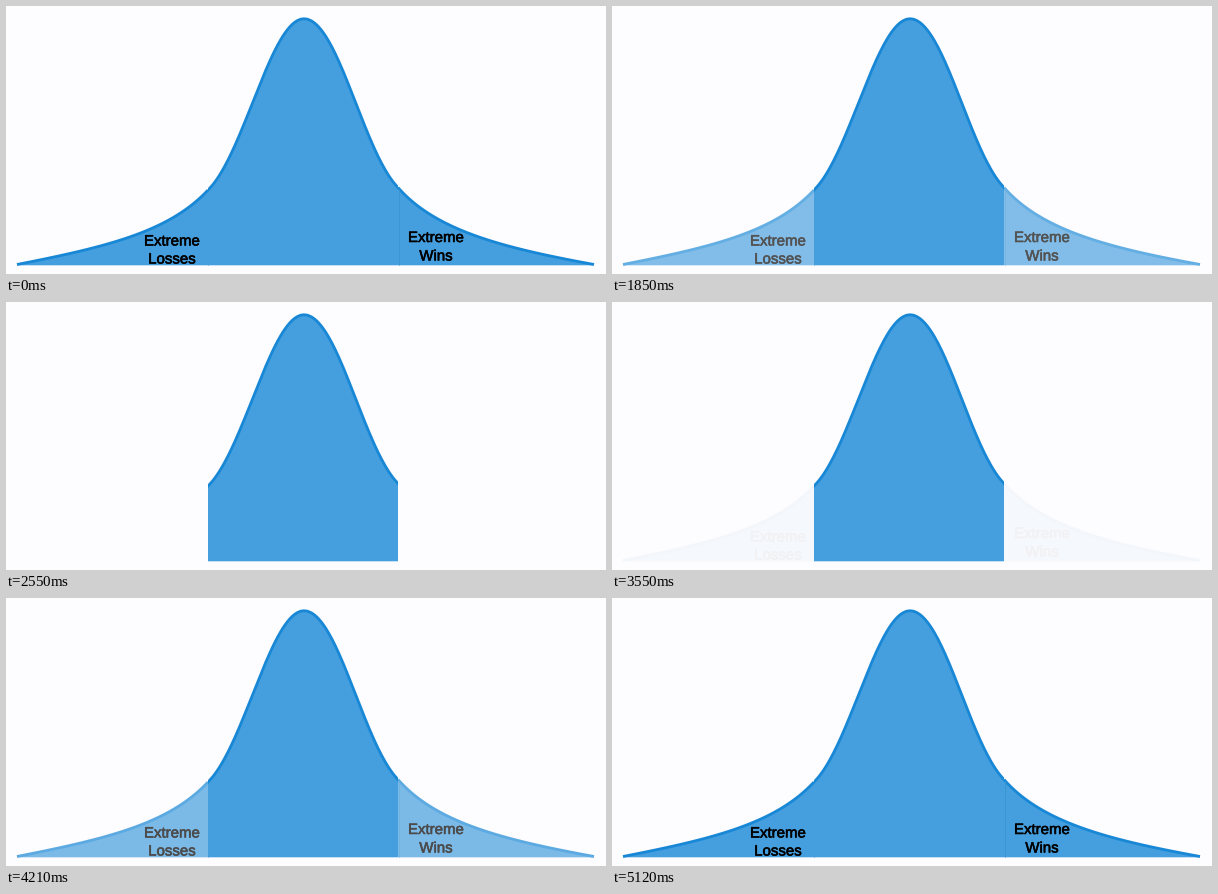
Write a matplotlib script that moves like this. It is 600x268 px and loops after 6 s.

```python
import numpy as np
import matplotlib.pyplot as plt
from matplotlib.animation import FuncAnimation
from matplotlib.patches import Polygon, Rectangle
from matplotlib.patheffects import withStroke

W, H, DPI = 600, 268, 100
PX = 72 / DPI
STEP, LOOP = 30, 6000
BG, FILL, EDGE, SEAM = "#fdfcfe", "#459fde", "#1888d6", "#3b95d3"
LEFT, RIGHT, BASE = 202, 392, 259.3

fig = plt.figure(figsize=(W / DPI, H / DPI), dpi=DPI, facecolor=BG)
ax = fig.add_axes([0, 0, 1, 1])
ax.set_xlim(0, W)
ax.set_ylim(H, 0)
ax.axis("off")


def bezier(*pts):
    p0, p1, p2, p3 = np.array(pts, float)
    t = np.linspace(0, 1, 80)[:, None]
    s = 1 - t
    return s**3 * p0 + 3 * s**2 * t * p1 + 3 * s * t**2 * p2 + t**3 * p3


def area(curve, z, clip=None):
    """Fill below a curve down to the base line and stroke its top."""
    corners = [(curve[-1, 0], BASE), (curve[0, 0], BASE)]
    ax.add_patch(Polygon(np.vstack([curve, corners]), fc=FILL, ec="none", zorder=z))
    line, = ax.plot(*curve.T, color=EDGE, lw=2.8 * PX, zorder=z + 0.1,
                    solid_capstyle="projecting" if clip else "butt")
    if clip:
        line.set_clip_path(clip)


def label(x, y, word):
    ax.text(x, y, word, family="Liberation Sans", fontsize=15 * PX, color="black",
            ha="center", va="baseline", zorder=3,
            path_effects=[withStroke(linewidth=0.55 * PX, foreground="black")])


# Tails with their captions
area(bezier((11, 258.5), (100, 241), (163, 226), (LEFT, 184)), 1)
area(bezier((RIGHT, 181.5), (430, 225), (498, 242), (588, 258.5)), 1)
for x, top in ((LEFT - 0.5, 185), (RIGHT + 0.5, 183)):
    ax.plot([x, x], [top, BASE], color=SEAM, lw=PX, zorder=2, solid_capstyle="butt")
label(166, 239.5, "Extreme")
label(166, 257.5, "Losses")
label(430, 236, "Extreme")
label(430, 254.5, "Wins")

# Background-coloured veil fades the tails as one group
veil = ax.add_patch(Rectangle((0, 0), W, H, fc=BG, ec="none", alpha=0, zorder=4))

# Central part stays on top
window = Rectangle((LEFT, 0), RIGHT - LEFT, H, transform=ax.transData)
rise = bezier((LEFT, 184), (238, 149), (265, 12.8), (298, 12.8))
fall = bezier((298, 12.8), (332, 12.8), (357, 146), (RIGHT, 181.5))
area(np.vstack([rise, fall[1:]]), 5, window)


def update(i):
    fade = np.interp(i * STEP, [1500, 2500, 3500, 4500], [0, 1, 1, 0])
    veil.set_alpha(float(fade))
    return [veil]


anim = FuncAnimation(fig, update, frames=LOOP // STEP, interval=STEP,
                     repeat=True, repeat_delay=0, blit=False)
plt.show()
```
